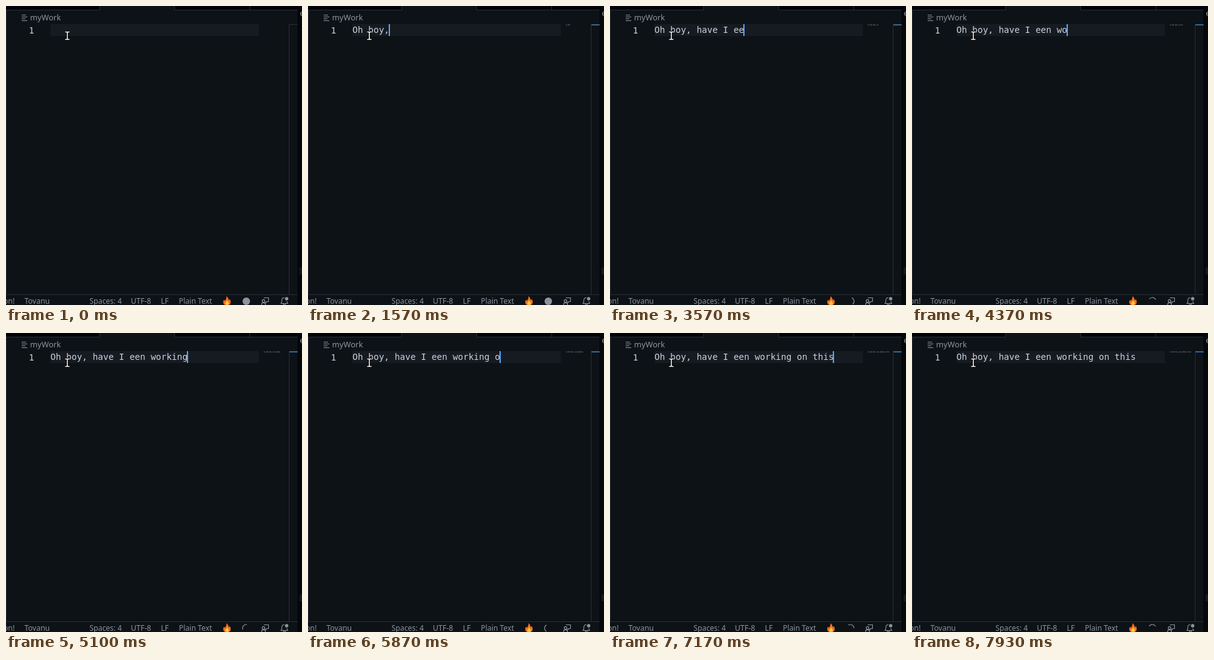
Animation, 473 px wide and 478 px high, one loop 8 s. Source, as an HTML page:

```html
<!DOCTYPE html>
<html lang="en">
<head>
<meta charset="utf-8">
<title>Typing in an editor</title>
<style>
html, body { margin: 0; width: 100%; height: 100%; overflow: hidden; background: #0d1216; }
svg { display: block; width: 473px; height: 478px; }
text { white-space: pre; }
.mono { font: 14px "DejaVu Sans Mono", monospace; fill: #c9d1d9; }
.ui { font: 12px "Noto Sans", "Open Sans", sans-serif; fill: #8b949e; }
.abc { font: 9px "Noto Sans", "Open Sans", sans-serif; }
.line { fill: none; stroke: #8b949e; stroke-width: 1.1; }
</style>
</head>
<body>
<svg viewBox="0 0 473 478">
  <rect width="473" height="478" fill="#0d1216"/>

  <!-- tabs and frame -->
  <path d="M0 0H149V6H0ZM270 0H389V6H270ZM390 0H466V6H390Z" fill="#010409"/>
  <path d="M0 6.5H149.5V0M269.5 0V6.5H466M389.5 0V6M.5 6V461.5H466M452.5 30V461M452 29.5H466" fill="none" stroke="#282e35"/>
  <rect x="466" width="7" height="478" fill="#05080b"/>
  <path d="M466.5 0V478" stroke="#010305"/>
  <text class="ui" x="469.5" y="16">e</text>
  <rect x="469" y="418" width="4" height="11" fill="#15191e"/>

  <!-- breadcrumb -->
  <path d="M25 14.5H32M25 17.5H34M25 20.5H31M25 23.5H34" stroke="#8b949e" stroke-width="1.2"/>
  <text class="ui" x="38.5" y="23" style="font-size:12.6px">myWork</text>

  <!-- editor -->
  <rect x="71" y="29" width="333" height="19" fill="#161b22"/>
  <text class="mono" x="36.5" y="44">1</text>
  <text class="mono" id="typed" x="71" y="43"></text>
  <rect id="caret" y="29" width="2" height="19" fill="#58a6ff"/>
  <g id="map" fill="#8b949e" opacity=".6"></g>
  <rect id="ruler" x="453" y="29.5" width="13" height="1.5" fill="#3f78b5"/>

  <g id="popup"></g>

  <!-- mouse pointers -->
  <g id="beam" fill="none">
    <path d="M94 41.5H97L98 42.5L99 41.5H102M98 42V53M94 53.5H97L98 52.5L99 53.5H102" stroke="#000" stroke-width="3.6"/>
    <path d="M94.5 41.5H97L98 42.5L99 41.5H101.5M98 42V53M94.5 53.5H97L98 52.5L99 53.5H101.5" stroke="#fff" stroke-width="1.5"/>
  </g>
  <path id="arrow" d="M97.5 47V62.5L101 59.3L103.7 65.3L106.2 64.2L103.6 58.4H108.3Z" fill="#0a0a0a" stroke="#fff" stroke-width="1.1"/>

  <!-- status bar -->
  <text class="ui" x="14" y="476" text-anchor="end">on!</text>
  <text class="ui" x="29.5" y="476">Tovanu</text>
  <text class="ui" x="133.6" y="476" style="font-size:11.8px">Spaces: 4</text>
  <text class="ui" x="199.5" y="476">UTF-8</text>
  <text class="ui" x="247.4" y="476">LF</text>
  <text class="ui" x="276.3" y="476" style="font-size:11.8px">Plain Text</text>
  <path d="M352 464C356 466 355 469 356.5 470.5L357.5 468.5C360 472 360 478 353.5 478.5C346.5 478.5 346 473 348.5 469.5L349.8 471.5C351.5 469 353 467 352 464Z" fill="#f4701f"/>
  <path d="M353.3 470C353.6 472.5 356.8 473.5 356 476C355 478.5 350.8 478.2 350.5 475.5C350.4 473.5 353 473 353.3 470Z" fill="#ffc83d"/>
  <circle id="badge" cx="384" cy="472" r="6" fill="#8b949e"/>
  <path id="spinner" class="line" d="M378.8 469A6 6 0 0 1 389.2 469"/>
  <g class="line">
    <path d="M412 466.5H419.5V472.5H417L415 474.8V472.5M408.5 478V477C408.5 473.5 414.5 473.5 414.5 477V478"/>
    <circle cx="411.5" cy="471.5" r="2.1"/>
    <path d="M445 466.2C441.5 466.2 440.7 468.5 440.7 471V473L439.4 475.5H450.2L449 473.2V472M443 476C443.5 478.3 446.4 478.3 446.9 476"/>
  </g>
  <circle cx="448.5" cy="468" r="2.7" fill="#8b949e"/>
</svg>
<script>
const LOOP = 8000, CHAR = 8.4287, LEFT = 71, ROW = 19;
const TEXT = "Oh boy, have I een working on this ";
const keyTimes = [
  330, 430, 600, 1070, 1130, 1470, 1570, 1700, 2030, 2130, 2270, 2400,
  2600, 2830, 3030, 3370, 3500, 3670, 3830, 4170, 4300, 4500, 4630, 4770,
  4900, 5030, 5170, 5370, 6000, 6200, 6600, 6800, 6930, 7070, 7200
];
const popups = [
  { from: 2030, to: 2130, items: ["Have"] },
  { from: 3370, to: 3500, items: ["Even"] },
  { from: 4170, to: 4300, items: ["Work"] },
  { from: 5370, to: 5530, items: ["Only"] },
  { from: 6630, to: 6800, items: ["This", "Today", "TODO Anchor"] },
  { from: 6800, to: 7070, items: ["This"], hits: 2 }
];
// [time, degrees] of the spinner
const turns = [[2270, -40], [2470, 32], [3570, 442], [4370, 725], [5870, 1350], [6700, 1620], [8000, 2191]];

const $ = id => document.getElementById(id);
const show = (id, on) => $(id).setAttribute("visibility", on ? "visible" : "hidden");

$("map").innerHTML = [...TEXT].map((c, i) =>
  c === " " ? "" : `<rect x="${412 + i}" y="${29.3 + i % 2 * 0.4}" width=".8" height="1.5"/>`).join("");
const dots = [...$("map").children];
const dotCols = [...TEXT].map((c, i) => i).filter(i => TEXT[i] !== " ");

function itemRow(label, i, hits) {
  const y = 48.5 + i * ROW;
  const icon = label.includes(" ")
    ? `<path class="line" d="M14.5 ${y + 3.5}H19.5L17.3 ${y + 8}H20L12.5 ${y + 15.5}L14.7 ${y + 10}H12Z"/>`
    : `<text class="abc" x="8.5" y="${y + 13}" fill="${i ? "#75beff" : "#d5dae0"}">abc</text>`;
  const back = i ? "" : `<rect x="6" y="49" width="430" height="19" fill="#363c42"/>`;
  return `${back}${icon}<text class="mono" x="28" y="${y + 14.5}">` +
    `<tspan fill="#58a6ff" font-weight="bold">${label.slice(0, hits)}</tspan>${label.slice(hits)}</text>`;
}

function popupMarkup({ items, hits = 1 }) {
  return `<rect x="5.5" y="48.5" width="431" height="${items.length * ROW + 3}" rx="1.5" fill="#161b22" stroke="#40464d"/>` +
    items.map((label, i) => itemRow(label, i, hits)).join("");
}

function spinAngle(t) {
  let i = 1;
  while (i < turns.length - 1 && t > turns[i][0]) i++;
  const [t0, a0] = turns[i - 1], [t1, a1] = turns[i];
  return a0 + (a1 - a0) * (t - t0) / (t1 - t0);
}

let current = null;
function draw(t) {
  const n = keyTimes.filter(k => k <= t).length;
  $("typed").textContent = TEXT.slice(0, n);
  $("caret").setAttribute("x", Math.floor(LEFT + n * CHAR - 1));
  show("caret", n > 0 && t < 7730);
  show("ruler", n > 0);
  dots.forEach((d, i) => d.setAttribute("visibility", dotCols[i] < n ? "visible" : "hidden"));

  const open = popups.find(p => t >= p.from && t < p.to) || null;
  if (open !== current) {
    $("popup").innerHTML = open ? popupMarkup(open) : "";
    current = open;
  }
  show("beam", !open);
  show("arrow", open);

  const busy = t >= turns[0][0];
  show("badge", !busy);
  show("spinner", busy);
  if (busy) $("spinner").setAttribute("transform", `rotate(${spinAngle(t)} 384 472)`);
}

const start = performance.now();
function frame() {
  draw((performance.now() - start) % LOOP);
  requestAnimationFrame(frame);
}
draw(0);
requestAnimationFrame(frame);
</script>
</body>
</html>
```
